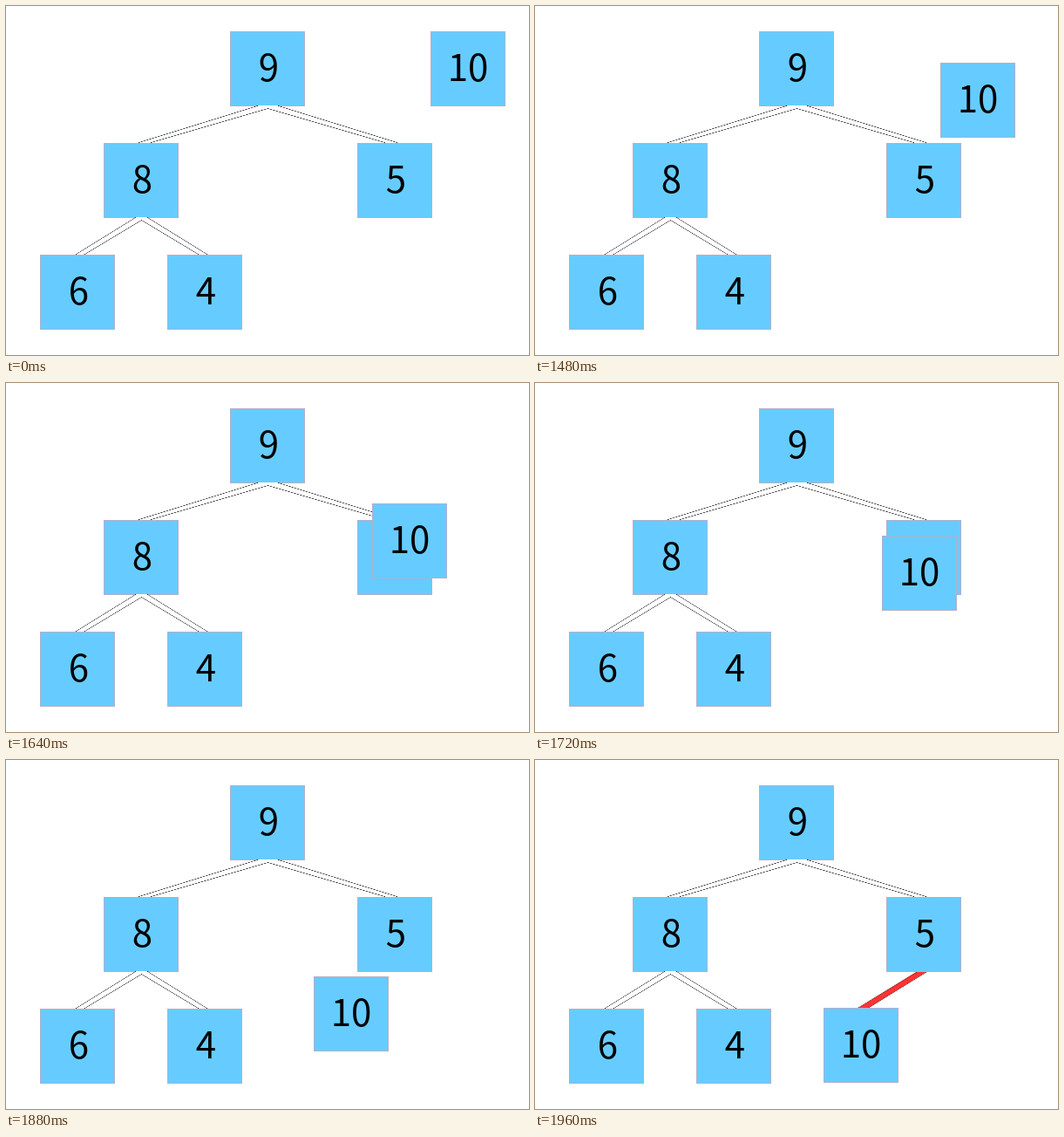
An HTML page with a canvas that plays this animation: 600 by 400 pixels, repeating every 4.84 s.

```html
<!DOCTYPE html>
<html lang="en">
<head>
<meta charset="utf-8">
<title>Heap insert</title>
<style>
html, body { margin: 0; width: 100%; height: 100%; overflow: hidden; background: #fff; }
canvas { display: block; }
</style>
</head>
<body>
<canvas id="stage" width="600" height="400"></canvas>
<script>
const ctx = document.getElementById('stage').getContext('2d');
const LOOP = 4840, START = 1440, STEP = 40, STEPS = 14, SIZE = 86;
const from = [487.4, 29], to = [331, 284];

const nodes = [
  ['9', 257, 29], ['8', 112, 157], ['5', 403, 157],
  ['6', 39, 285], ['4', 185, 285]
];

function box(label, x, y) {
  ctx.fillStyle = '#b0b0cc';
  ctx.fillRect(x, y, SIZE, SIZE);
  ctx.fillStyle = '#66ccff';
  ctx.fillRect(x + 1, y + 1, SIZE - 2, SIZE - 2);
  ctx.fillStyle = '#000';
  ctx.fillText(label, x + (label.length > 1 ? 43 : 44.5), y + 57);
}

// Thin pixel line that fades where it falls between two rows
function line(x0, y0, x1, y1) {
  const n = Math.abs(x1 - x0);
  for (let i = 0; i <= n; i++) {
    const x = x0 + Math.sign(x1 - x0) * i;
    const y = y0 + (y1 - y0) * i / n;
    const row = Math.round(y);
    ctx.globalAlpha = 1 - 1.8 * Math.abs(y - row);
    ctx.fillRect(x, row, 1, 1);
  }
  ctx.globalAlpha = 1;
}

// Hollow bars from a parent down to both children
function fork(cx, top, half, apex, bottom, outer, inner) {
  ctx.fillStyle = '#fff';
  ctx.fillRect(cx - half + 1, top, half * 2 - 1, 1);
  ctx.fillStyle = '#222';
  for (const side of [-1, 1]) {
    line(cx + side * half, top, cx + side * outer, bottom);
    line(cx, apex, cx + side * inner, bottom);
  }
}

function redBar() {
  ctx.fillStyle = '#ff3333';
  ctx.beginPath();
  ctx.moveTo(437, 243);
  ctx.lineTo(449, 243);
  ctx.lineTo(383, 284);
  ctx.lineTo(371, 284);
  ctx.fill();
  ctx.fillStyle = '#633';
  line(437, 243, 371, 283);
  line(448, 243, 383, 283);
}

function draw(now) {
  const t = now % LOOP;
  const n = t < START ? 0 : Math.min(STEPS, Math.floor((t - START) / STEP) + 1);
  const at = i => Math.round(from[i] + (to[i] - from[i]) * n / STEPS);

  ctx.fillStyle = '#fff';
  ctx.fillRect(0, 0, 600, 400);
  ctx.font = '42px "Noto Sans CJK JP", "Noto Sans CJK SC", "Noto Sans CJK", sans-serif';
  ctx.textAlign = 'center';
  for (const node of nodes) box(...node);
  fork(300, 114, 12, 117, 156, 148, 134);
  fork(155, 242, 7, 245, 284, 75, 65);
  if (n === STEPS) redBar();
  box('10', at(0), at(1));
}

const begin = performance.now();
function tick() {
  draw(performance.now() - begin);
  requestAnimationFrame(tick);
}
tick();
</script>
</body>
</html>
```
